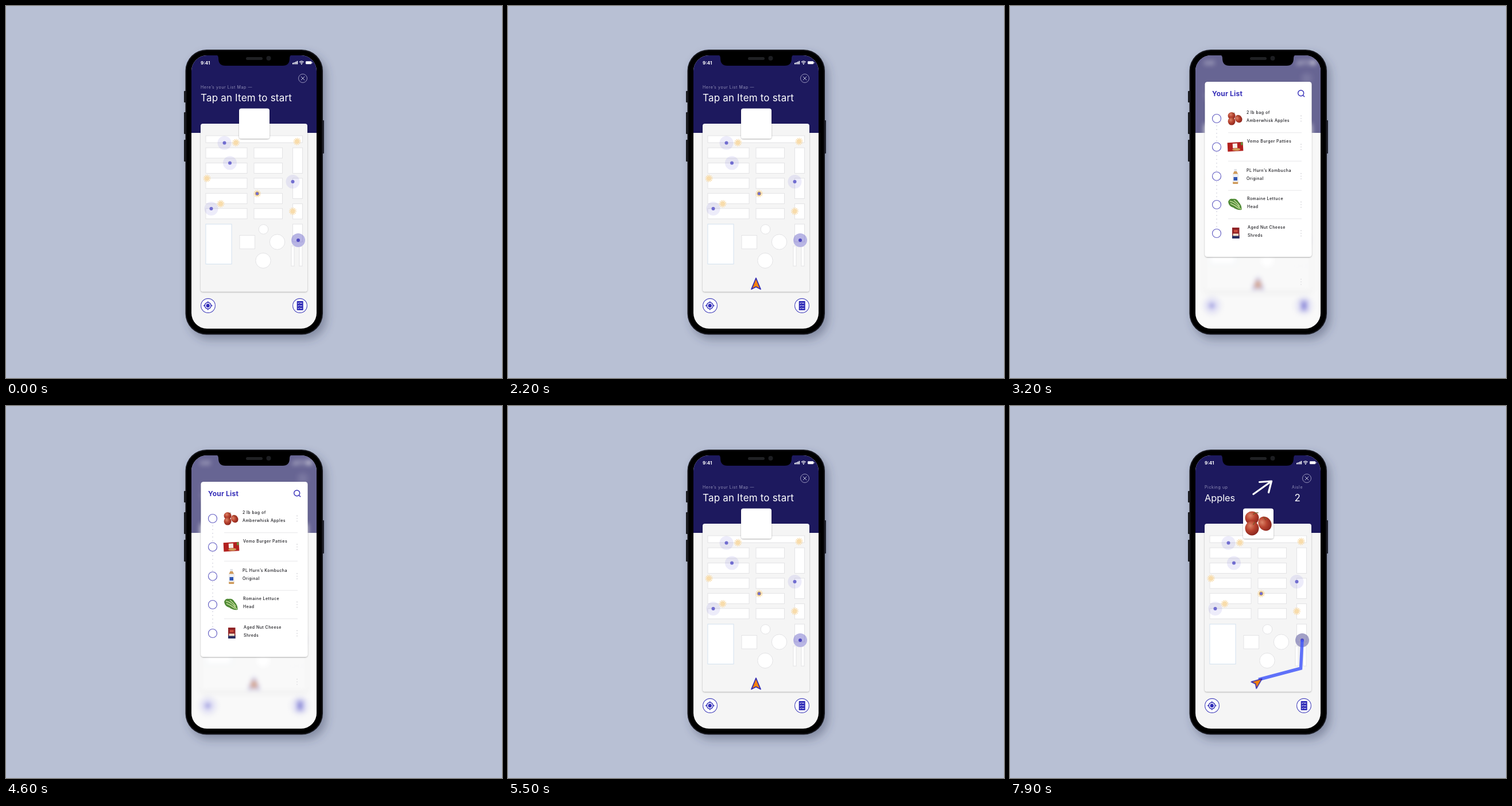
Write an HTML page that moves like this. It is 864 px wide and 648 px high and loops after 8 s.

```html
<!DOCTYPE html>
<html lang="en">
<head>
<meta charset="utf-8">
<title>Store list map</title>
<style>
html, body { margin: 0; width: 100%; height: 100%; overflow: hidden; background: #b8c0d4; }
svg { display: block; width: 864px; height: 648px; font-family: Inter, Roboto, sans-serif; }
.title { font-size: 17px; fill: #fff; }
.label { font-size: 7px; letter-spacing: .62px; fill: #9391b8; }
.item { font-size: 7px; font-weight: 500; letter-spacing: .47px; fill: #17171c; }
.shelf { fill: #fff; stroke: #e3e3e5; }
.halo { fill: #4a41d2; fill-opacity: .1; }
.dot { fill: #716dd0; }

#app, #veil, #modal, #pointer, .before, .after, #target, #route, #heading {
  animation: 8s linear infinite both;
}
#app { animation-name: blur; }
#veil { animation-name: veil; }
#modal { animation-name: modal; transform-origin: 432px 284px; }
#pointer { animation-name: pointer; transform-origin: 432px 484px; }
.before { animation-name: before; }
.after { animation-name: after; }
#target { animation-name: target; }
#route { animation-name: route; stroke-dasharray: 1 1; }
#heading { animation-name: heading; stroke-dasharray: 1 1; }

@keyframes blur {
  0%, 29.4% { filter: none; animation-timing-function: ease-out; }
  33.75%, 58.75% { filter: blur(4px); animation-timing-function: ease-in-out; }
  63.1%, 100% { filter: none; }
}
@keyframes veil {
  0%, 29.4% { opacity: 0; animation-timing-function: ease-out; }
  33.75%, 58.75% { opacity: .33; animation-timing-function: ease-in-out; }
  63.1%, 100% { opacity: 0; }
}
@keyframes modal {
  0%, 29.4% { opacity: 0; transform: translateY(8px) scale(.96); animation-timing-function: ease-out; }
  33.75%, 58.75% { opacity: 1; transform: none; animation-timing-function: ease-in-out; }
  63.1%, 100% { opacity: 0; transform: translateY(8px) scale(.96); }
}
@keyframes pointer {
  0%, 16% { opacity: 0; transform: scale(.5); animation-timing-function: ease-out; }
  20%, 85% { opacity: 1; transform: none; animation-timing-function: ease-in-out; }
  89%, 100% { opacity: 1; transform: translate(-.5px, -3px) rotate(52deg) scale(.92); }
}
@keyframes before { 0%, 73.75% { opacity: 1; } 76.5%, 100% { opacity: 0; } }
@keyframes after { 0%, 75% { opacity: 0; } 79%, 100% { opacity: 1; } }
@keyframes target {
  0%, 73.75% { fill: #b8b5e4; }
  77.5%, 100% { fill: #a2a0c6; }
}
@keyframes route {
  0%, 86% { stroke-dashoffset: 1; animation-timing-function: ease-in-out; }
  95%, 100% { stroke-dashoffset: 0; }
}
@keyframes heading {
  0%, 86% { opacity: 0; stroke-dashoffset: 1; animation-timing-function: ease-out; }
  86.5% { opacity: 1; }
  91.5%, 100% { opacity: 1; stroke-dashoffset: 0; }
}
</style>
</head>
<body>
<svg viewBox="0 0 864 648">
  <defs>
    <filter id="phoneShadow" x="-20%" y="-20%" width="140%" height="140%">
      <feDropShadow dx="6" dy="8" stdDeviation="8" flood-color="#39415c" flood-opacity=".42"/>
    </filter>
    <filter id="cardShadow" x="-10%" y="-10%" width="120%" height="120%">
      <feDropShadow dx="0" dy="1" stdDeviation="1.2" flood-color="#000" flood-opacity=".32"/>
    </filter>
    <clipPath id="screen"><rect x="323" y="86" width="218" height="476" rx="27"/></clipPath>
    <radialGradient id="skin" cx=".38" cy=".32" r=".7">
      <stop offset="0" stop-color="#dc8468"/><stop offset=".5" stop-color="#b8432f"/><stop offset="1" stop-color="#8a251d"/>
    </radialGradient>
    <g id="sun" fill="#f8dcab">
      <circle r="3.9"/>
      <circle r="4.7" fill="none" stroke="#f8dcab" stroke-width="3.6" pathLength="24" stroke-dasharray="1 1"/>
    </g>
    <g id="apples">
      <g fill="url(#skin)">
        <ellipse cx="-11" cy="-9" rx="12" ry="11.5"/>
        <ellipse cx="11.5" cy="1" rx="11" ry="13" transform="rotate(-35 11.5 1)"/>
        <ellipse cx="-11" cy="9" rx="12" ry="12.5"/>
      </g>
      <path d="M-9 -15Q-6 -19 0 -18M13 -5L9 -11M-9 3L-6 -2" fill="none" stroke="#6d5a2b" stroke-width="1.3"/>
    </g>
    <g id="more" fill="#c9c9cf"><circle cy="-4.6" r=".8"/><circle r=".8"/><circle cy="4.6" r=".8"/></g>
  </defs>

  <rect width="864" height="648" fill="#b8c0d4"/>
  <g fill="#17181c">
    <rect x="310" y="148" width="6" height="20" rx="1"/>
    <rect x="310" y="185" width="6" height="38" rx="1"/>
    <rect x="310" y="233" width="6" height="38" rx="1"/>
    <rect x="548" y="199" width="6" height="58" rx="1"/>
  </g>
  <rect x="312.5" y="76" width="239.5" height="496.5" rx="37" fill="#18191d" filter="url(#phoneShadow)"/>
  <rect x="314.5" y="78" width="235.5" height="492.5" rx="35" fill="#000"/>

  <g clip-path="url(#screen)">
    <rect x="323" y="86" width="218" height="476" fill="#f5f5f5"/>
    <rect x="323" y="86" width="218" height="135" fill="#1d195e"/>

    <g id="app">
      <text x="339" y="101.7" font-size="8" font-weight="700" fill="#fff">9:41</text>
      <g fill="#fff">
        <path d="M499 99h1.7v2.5h-1.7zM501.5 98h1.7v3.5h-1.7zM504 97h1.7v4.5h-1.7zM506.5 95.7h1.7v5.8h-1.7z"/>
        <rect x="522" y="96.2" width="10.2" height="5" rx="1.2"/><rect x="532.6" y="97.7" width="1" height="2" rx=".5"/>
        <circle cx="514.8" cy="101" r="1"/>
      </g>
      <path d="M511 97.7Q514.8 94.4 518.6 97.7M512.6 99.4Q514.8 97.5 517 99.4" fill="none" stroke="#fff" stroke-width="1.2"/>
      <g fill="none" stroke="#a3a1c4">
        <circle cx="517" cy="126" r="7.5" stroke-width=".9"/>
        <path d="M513.8 122.8l6.4 6.4m0 -6.4l-6.4 6.4" stroke="#c5c4dc"/>
      </g>

      <g class="before">
        <text class="label" x="339" y="144">Here’s your List Map —</text>
        <text class="title" x="339" y="166" letter-spacing=".18">Tap an Item to start</text>
      </g>
      <g class="after">
        <text class="label" x="339" y="144">Picking up</text>
        <text class="title" x="339" y="166" style="font-size:16.3px">Apples</text>
        <text class="label" x="491" y="144">Aisle</text>
        <text class="title" x="495.5" y="166">2</text>
      </g>
      <path id="heading" pathLength="1" d="M424 153.5L455.5 131L434.5 132.5L455.5 131L450.5 150.5" fill="none" stroke="#fff" stroke-width="3.2" stroke-linecap="round" stroke-linejoin="round"/>

      <rect x="339" y="205" width="186" height="292.5" rx="4" fill="#f5f5f5" filter="url(#cardShadow)"/>
      <g id="shelves"></g>
      <rect x="348" y="380" width="45" height="69.5" fill="#fff" stroke="#d3e2f0"/>
      <g class="shelf">
        <rect x="407" y="399.5" width="26.5" height="23.5"/>
        <circle cx="448.5" cy="389" r="8.3"/>
        <circle cx="472.5" cy="411" r="13.2"/>
        <circle cx="448" cy="443.5" r="13.2"/>
      </g>
      <g id="marks"></g>
      <circle id="target" cx="509" cy="408" r="12"/>
      <path d="M499.5 399v12h17v-12" fill="none" stroke="#7773bd" stroke-opacity=".25"/>
      <circle cx="509" cy="408" r="3" fill="#4f49c0"/>
      <path id="route" pathLength="1" d="M433 476.5L506.5 457L509 407.5" fill="none" stroke="#4257fa" stroke-opacity=".83" stroke-width="5.5"/>
      <path id="pointer" d="M432 474L440 493.3L432 489.3L424 493.3Z" fill="#f5820c" stroke="#3029b4" stroke-width="1.7" stroke-linejoin="round"/>

      <rect x="406" y="178.5" width="53" height="52.5" rx="4" fill="#fff" filter="url(#cardShadow)"/>
      <g class="after"><use href="#apples" x="432.5" y="204"/></g>

      <g fill="#fff" stroke="#4744bd" stroke-width="1.1">
        <circle cx="352" cy="522" r="12.4"/><circle cx="512" cy="522" r="12.4"/>
      </g>
      <g stroke="#302cb8" stroke-width="1.4" fill="none">
        <circle cx="351.7" cy="522" r="5.5"/>
        <path d="M351.7 514.2v2.6m0 10.4v2.6M343.9 522h2.6m10.4 0h2.6"/>
      </g>
      <circle cx="351.7" cy="522" r="3.2" fill="#302cb8"/>
      <rect x="506.7" y="514" width="11" height="16" rx=".8" fill="#302cb8"/>
      <path d="M508.4 517.4l1 1l1.6 -2m1 1.2h3.8M508.4 522l1 1l1.6 -2m1 1.2h3.8M508.4 526.6l1 1l1.6 -2m1 1.2h3.8" fill="none" stroke="#fff" stroke-width="1"/>
    </g>

    <rect id="veil" x="323" y="86" width="218" height="476" fill="#fff"/>

    <g id="modal">
      <use href="#more" x="507" y="480.5" opacity=".7"/>
      <rect x="339.5" y="132" width="186" height="305" rx="4.5" fill="#fff" filter="url(#cardShadow)"/>
      <text x="352" y="156.5" font-size="12" font-weight="700" letter-spacing=".2" fill="#342db8">Your List</text>
      <g fill="none" stroke="#342db8" stroke-width="1.4"><circle cx="506.7" cy="151.8" r="5"/><path d="M510.3 155.4l2.8 2.8"/></g>
      <path d="M360 208v180" stroke="#cfcfdb" stroke-width="1.5" stroke-dasharray="1.5 5"/>
      <g id="rows"></g>

      <use href="#apples" transform="translate(392 196) scale(.54)"/>
      <g transform="rotate(-3 392 245)">
        <rect x="379" y="237.5" width="27" height="15.5" fill="#b3211f"/>
        <rect x="388" y="239.5" width="8" height="8" fill="#f7efe8"/>
        <ellipse cx="394" cy="250" rx="7" ry="2.4" fill="#d09a58"/>
        <rect x="402.5" y="238" width="3" height="5" fill="#5f9a3c"/>
      </g>
      <rect x="390.4" y="284" width="4.6" height="5" fill="#dfe3ea"/>
      <path d="M390.5 288h4.4l2.4 5v16q0 1 -1 1h-7.200q-1 0 -1 -1v-16z" fill="#cf9b5b"/>
      <rect x="388.100" y="292.500" width="9.200" height="14" fill="#eef1f7"/>
      <rect x="389.500" y="298" width="6.500" height="6" fill="#2f55b4"/>
      <path d="M380 341Q382 335 388 336Q395 335 398 341Q404 347 403.500 355Q395 356 389 351Q381 349 380 341Z" fill="#4f8a35"/>
      <path d="M383 340Q392 341 402 354M384 344Q392 347 399 353M390 338Q396 343 400 349" fill="none" stroke="#c4dc9a" stroke-width="1.500"/>
      <rect x="387" y="386" width="12.500" height="19" fill="#8f2326"/>
      <rect x="387" y="399.500" width="12.500" height="5.500" fill="#272c5f"/>
      <rect x="390" y="390" width="6.500" height="4" fill="#c94a3d"/>
      <rect x="388.500" y="396.500" width="9.500" height="4" fill="#f0e2cd"/>
    </g>
  </g>

  <path d="M366 85H498Q494 86 494 91Q494 104 482 104H382Q370 104 370 91Q370 86 366 85Z" fill="#000"/>
  <rect x="418" y="89" width="29" height="5" rx="2.5" fill="#202124"/>
  <circle cx="457.500" cy="91" r="4" fill="#1d1e22"/>
</svg>
<script>
const NS = 'http://www.w3.org/2000/svg';
const add = (id, tag, attrs, text) => {
  const el = document.createElementNS(NS, tag);
  for (const k in attrs) el.setAttribute(k, attrs[k]);
  if (text) el.textContent = text;
  document.getElementById(id).append(el);
};
const shelf = (x, y, width, height) =>
  add('shelves', 'rect', { class: 'shelf', x, y, width, height });

shelf(348, 226, 168.5, 12);
for (let i = 0; i < 5; i++) {
  shelf(348, 247 + i * 26.45, 72, 18);
  shelf(432, 247 + i * 26.45, 49.5, 18);
}
[[247, 44.5], [300, 35.5], [344.5, 26.5], [380, 31]].forEach(([y, h]) => shelf(499.5, y, 17, h));
shelf(497, 418, 5, 35);
shelf(511, 418, 5, 35);

[[400.5, 238], [507, 236], [350, 300.3], [374, 344.5], [499.5, 357.5], [437.5, 326.8]]
  .forEach(([x, y]) => add('marks', 'use', { href: '#sun', x, y }));
[[380.5, 238.5], [390, 273.5], [499.5, 306], [357.5, 353]].forEach(([cx, cy]) => {
  add('marks', 'circle', { class: 'halo', cx, cy, r: 12 });
  add('marks', 'circle', { class: 'dot', cx, cy, r: 3 });
});
add('marks', 'circle', { cx: 437.5, cy: 326.8, r: 3.2, class: 'dot', stroke: '#efc04e', 'stroke-width': 1 });

const rows = [
  [196, 412, '2 lb bag of', 'Amberwhisk Apples'],
  [245.5, 413, 'Vemo Burger Patties'],
  [296.5, 412, 'PL Hurn’s Kombucha', 'Original'],
  [346, 413, 'Romaine Lettuce', 'Head'],
  [396, 414, 'Aged Nut Cheese', 'Shreds']
];
rows.forEach(([y, x, ...lines], i) => {
  add('rows', 'circle', { cx: 360, cy: y, r: 7.5, fill: '#fff', stroke: '#6661c4', 'stroke-width': 1.2 });
  add('rows', 'use', { href: '#more', x: 507, y });
  lines.forEach((line, n) => add('rows', 'text', { class: 'item', x, y: y - 7.7 + n * 13.8 }, line));
  if (i < 4) add('rows', 'path', { d: `M380 ${y + 24.7}H508`, stroke: '#e7e7ea' });
});
</script>
</body>
</html>
```
